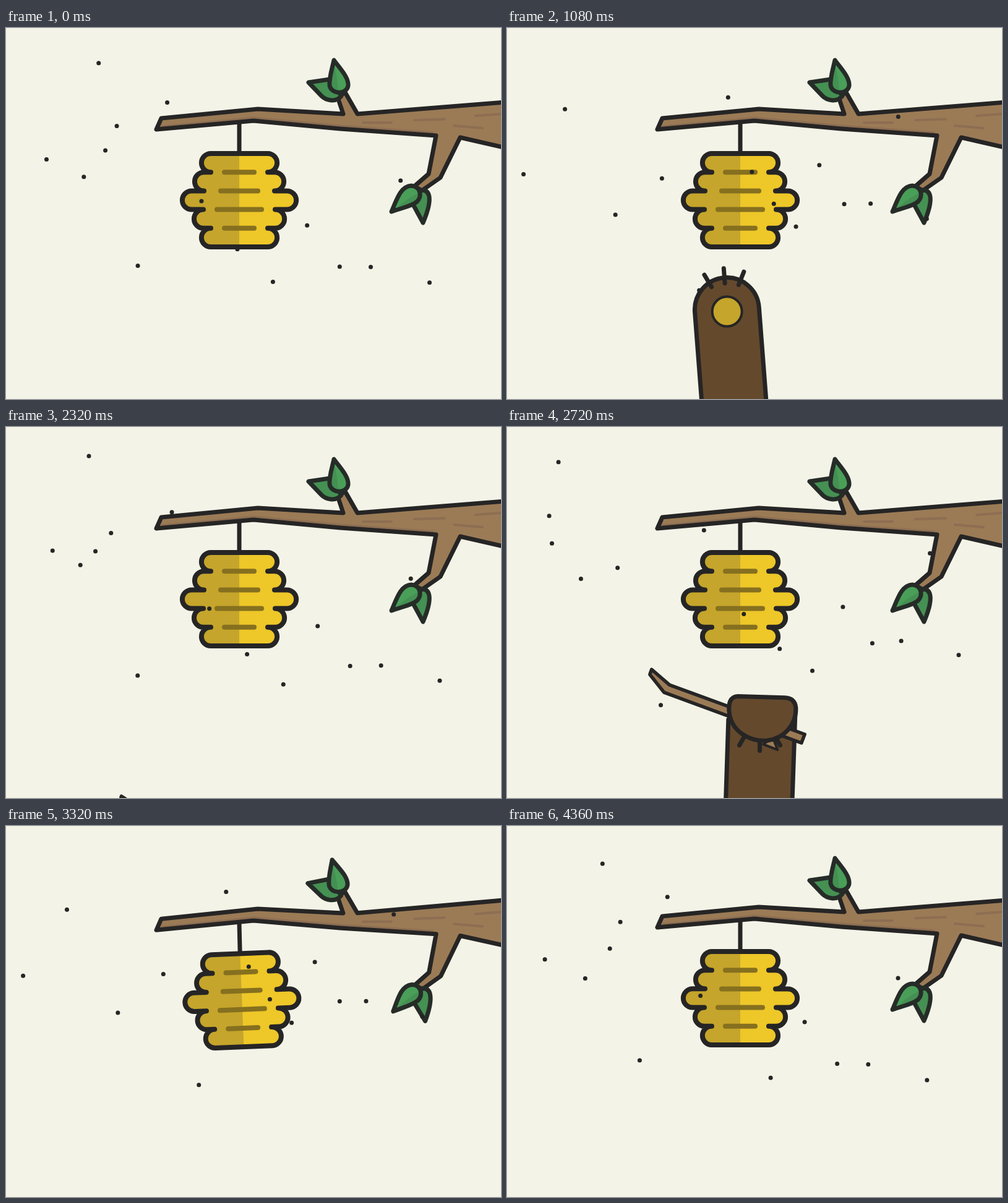
Recreate the animation shown at these times as an HTML page with a canvas. Size 800x600 px, loop 4400 ms.

```html
<!DOCTYPE html>
<html lang="en">
<head>
<meta charset="utf-8">
<title>Beehive</title>
<style>
  html, body { margin: 0; width: 100%; height: 100%; overflow: hidden; background: #f3f3e7; }
  canvas { display: block; }
</style>
</head>
<body>
<canvas id="stage" width="800" height="600"></canvas>
<script>
const ctx = document.getElementById('stage').getContext('2d');
const LOOP = 4400, FLIGHT = 2200, RAD = Math.PI / 180;
const INK = '#262525', WOOD = '#9b7b56', GRAIN = '#8d6e52', FUR = '#64492d';
const GOLD = '#eec728', OCHRE = '#c5a52b', DASH = '#86701f';
const LEAF = '#4a9f58', LEAF_DARK = '#459053', LEAF_INK = '#262c28';

// Mean heights of the bees, spread evenly from left to right
const beeHeights = [170, 240, 95, 250, 200, 403, 115, 255, 320, 365, 270, 335, 335, 195, 360];

// Half-widths of the hive's rows and dashes
const MID = 377, ROW_TOP = 203, ROW_H = 30.2;
const rows = [46, 57, 77, 58, 46], dashes = [24, 30, 36, 24];

const hive = new Path2D();
const rowY = i => ROW_TOP + ROW_H * (i + .5);
rows.forEach((w, i) => hive.arc(MID + w, rowY(i), ROW_H / 2, -Math.PI / 2, Math.PI / 2));
for (let i = rows.length - 1; i >= 0; i--)
  hive.arc(MID - rows[i], rowY(i), ROW_H / 2, Math.PI / 2, Math.PI * 1.5);
hive.closePath();

const branch = new Path2D('M830 118L568 139L548 104L536 112L545 139L407 131L251 146L243 164L400 150' +
  'L540 163L695 174L683 236L660 256L672 263L702 242L734 177L830 199Z');
const shade = new Path2D('M252 159L400 145L540 158L690 169');
const grain = new Path2D('M577 153H623M660 149L709 147.5M724 158L770 162M759 142L830 137');
const paw = new Path2D('M-52 400V-3A52 52 0 0 1 52 -3V400Z');
const forearm = new Path2D('M467 476L306 976H418L575 492Z');
const stick = new Path2D('M370 364L365 371L379 405L570 545L579 533L391 396Z');
const spur = new Path2D('M510 530L530 545L528 524Z');
const fist = new Path2D('M492 444L564 467Q580 472 577 488C570 515 545 530 518 526C488 520 468 495 471 468Q475 440 492 444Z');

const topLeaves = [
  new Path2D('M489 88L523 83L542 110C532 122 516 116 510 110Z'),
  new Path2D('M530 52C540 66 554 80 553 93C551 108 526 108 523 93C522 80 527 66 530 52Z')
];
const lowLeaves = [
  new Path2D('M674 315L655 280L672 262C688 262 688 282 674 315Z'),
  new Path2D('M623 297C632 276 638 256 655 255C670 256 673 272 664 281C654 289 639 291 623 297Z')
];
const topVein = new Path2D('M530 60C527 75 524 88 530 101L537 102Q536 78 530 60Z');
const lowVein = new Path2D('M629 293C641 282 654 272 667 267C669 280 658 285 629 293Z');

function outline(path, width = 7, ink = INK) {
  ctx.strokeStyle = ink;
  ctx.lineWidth = width;
  ctx.stroke(path);
}

function fill(path, color) {
  ctx.fillStyle = color;
  ctx.fill(path);
}

function shape(path, color, width, ink) {
  fill(path, color);
  outline(path, width, ink);
}

function line(x1, y1, x2, y2, ink = INK, width = 7) {
  const path = new Path2D();
  path.moveTo(x1, y1);
  path.lineTo(x2, y2);
  outline(path, width, ink);
}

function disc(x, y, r) {
  const path = new Path2D();
  path.arc(x, y, r, 0, Math.PI * 2);
  return path;
}

function turned(x, y, angle, draw) {
  ctx.save();
  ctx.translate(x, y);
  ctx.rotate(angle * RAD);
  ctx.translate(-x, -y);
  draw();
  ctx.restore();
}

function ease(t, from, to) {
  const u = Math.min(1, Math.max(0, (t - from) / (to - from)));
  return u * u * (3 - 2 * u);
}

// Damped sway after the stick's hit
function sway(t) {
  const s = t - 2980;
  if (s <= 0 || s >= 1420) return 0;
  return -5.3 * Math.pow(1 - s / 1420, 1.4) * Math.sin(s / 880 * Math.PI * 2);
}

function drawHive() {
  fill(hive, GOLD);
  ctx.save();
  ctx.clip(hive);
  ctx.fillStyle = OCHRE;
  ctx.fillRect(MID - 110, 190, 110, 180);
  ctx.restore();
  dashes.forEach((w, i) => {
    const y = ROW_TOP + ROW_H * (i + 1);
    line(MID - w, y, MID + w, y, DASH, 8);
  });
  outline(hive, 8);
}

// The thread swings about half as far as the hive below it
function drawHanging(swing) {
  turned(MID, 153, swing * .5, () => {
    line(MID, 153, MID, 200);
    turned(MID, 200, swing * .5, drawHive);
  });
}

function drawLeaves([back, front], vein) {
  shape(back, LEAF_DARK, 7, LEAF_INK);
  fill(front, LEAF);
  fill(vein, LEAF_DARK);
  outline(front, 7, LEAF_INK);
}

function drawBranch(bend) {
  fill(branch, WOOD);
  outline(shade, 3, GRAIN);
  outline(grain, 4, GRAIN);
  outline(branch);
  turned(545, 105, bend * 5, () => drawLeaves(topLeaves, topVein));
  turned(662, 255, bend * 5, () => drawLeaves(lowLeaves, lowVein));
}

function drawPaw(t) {
  const drop = 260 * (1 - ease(t, 680, 980) + ease(t, 1920, 2200));
  const angle = -.95 - 3.45 * Math.cos((t - 1080) / 600 * Math.PI);
  turned(369, 632, angle, () => {
    ctx.translate(369, 458 + drop);
    shape(paw, FUR);
    for (const i of [-1, 0, 1]) {
      const low = Math.abs(i);
      line(32 * i, -70 + 8 * low, 22 * i, -46 + 4.5 * low);
    }
    shape(disc(0, 0, 24), OCHRE, 4);
  });
}

function drawStick(t) {
  const rise = ease(t, 2240, 2560);
  const drop = 210 * (1 - rise) + 290 * ease(t, 3120, 3360);
  const angle = -26 + 10 * rise + 16 * ease(t, 2820, 3040);
  turned(402, 863, angle, () => {
    ctx.translate(-.309 * drop, .951 * drop);
    shape(forearm, FUR);
    shape(spur, WOOD, 4);
    shape(stick, WOOD, 5.5);
    shape(fist, FUR);
    for (const i of [-1, 0, 1])
      turned(520, 475, 106 + 30 * i, () => line(573, 475, 586, 475));
  });
}

// Bees circle their places; those further left lag behind
function drawBees(t) {
  beeHeights.forEach((height, i) => {
    const left = 1 - i / (beeHeights.length - 1);
    const a = t / FLIGHT * 360 - 85 - 320 * Math.pow(left, 2.5);
    const x = 680 - 650 * left + 50 * Math.cos(a * RAD);
    const y = height + 52 * Math.cos((a + 80) * RAD);
    fill(disc(x, y, 3.5), INK);
  });
}

function frame(now) {
  const t = now % LOOP;
  const swing = sway(t), bend = .14 * sway(t - 40);
  ctx.fillStyle = '#f3f3e7';
  ctx.fillRect(0, 0, 800, 600);
  ctx.lineCap = ctx.lineJoin = 'round';
  turned(800, 160, bend, () => {
    drawHanging(swing - bend);
    drawBranch(bend);
  });
  if (t > 680 && t < 2200) drawPaw(t);
  if (t > 2240 && t < 3360) drawStick(t);
  drawBees(t);
  requestAnimationFrame(frame);
}
requestAnimationFrame(frame);
</script>
</body>
</html>
```
